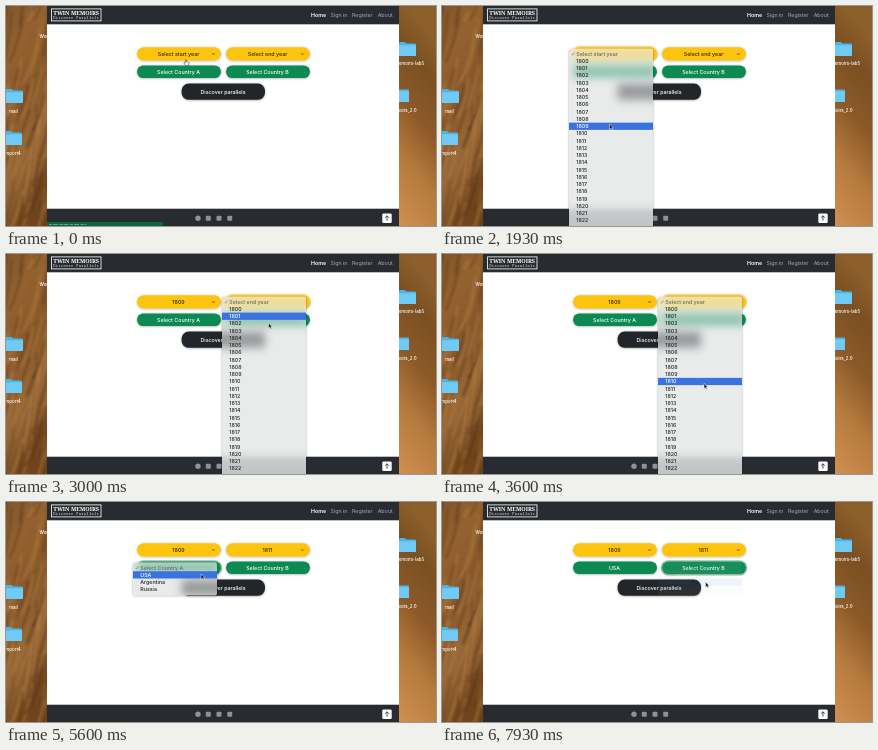
Animation, 430 px wide and 220 px high, one loop 8000 ms. Source, as an HTML page:

```html
<!DOCTYPE html>
<html lang="en">
<head>
<meta charset="utf-8">
<title>Year and country picker</title>
<style>
  html, body { margin: 0; width: 100%; height: 100%; overflow: hidden; background: #fff; }
  #stage { display: block; width: 100vw; height: 100vh; }
  text { font: 500 5.3px Inter, "Open Sans", sans-serif; }
  .desk { font-size: 4.4px; fill: #fff; }
  .nav { fill: #a9abae; font-weight: 400; }
  .home { fill: #fff; font-weight: 600; }
  .name { font: bold 5.6px "Noto Serif", "Liberation Serif", serif; fill: #fff; }
  .tag { font: 3.7px "Noto Sans Mono", "DejaVu Sans Mono", monospace; letter-spacing: .33px; fill: #e8e8e8; }
</style>
</head>
<body>
<svg id="stage" viewBox="0 0 430 220" preserveAspectRatio="none">
  <defs>
    <linearGradient id="furL" x1="0" y1="0" x2=".3" y2="1">
      <stop offset="0" stop-color="#80562b"/><stop offset=".25" stop-color="#94622f"/>
      <stop offset=".5" stop-color="#875729"/><stop offset=".75" stop-color="#9a6a38"/>
      <stop offset="1" stop-color="#74481f"/>
    </linearGradient>
    <linearGradient id="furR" x1=".3" y1="0" x2=".1" y2="1">
      <stop offset="0" stop-color="#8d602b"/><stop offset=".2" stop-color="#7b5022"/>
      <stop offset=".45" stop-color="#8c5a28"/><stop offset=".7" stop-color="#b57a3d"/>
      <stop offset="1" stop-color="#cd8f50"/>
    </linearGradient>
    <filter id="drop" x="-20%" y="-20%" width="140%" height="150%">
      <feDropShadow dx="0" dy=".5" stdDeviation=".9" flood-opacity=".35"/>
    </filter>
    <filter id="blur" x="-40%" y="-150%" width="180%" height="400%">
      <feGaussianBlur stdDeviation="4.5"/>
    </filter>
    <filter id="hair" x="-50%" y="-20%" width="200%" height="140%">
      <feGaussianBlur stdDeviation=".8"/>
    </filter>
  </defs>
</svg>
<script>
const LOOP = 8000, ROW = 7.25;
const YELLOW = '#fdc40c', GREEN = '#0d8a52', DARK = '#282c31';
const stage = document.getElementById('stage');

function el(parent, tag, attrs = {}, content) {
  const node = document.createElementNS('http://www.w3.org/2000/svg', tag);
  for (const key in attrs) node.setAttribute(key, attrs[key]);
  if (content !== undefined) node.textContent = content;
  parent.append(node);
  return node;
}
const rect = (parent, x, y, width, height, fill, rx = 0, more = {}) =>
  el(parent, 'rect', { x, y, width, height, fill, rx, ...more });
const path = (parent, d, more) => el(parent, 'path', { d, fill: 'none', ...more });
const label = (parent, x, y, content, more = {}) =>
  el(parent, 'text', { x, y: y + 1.9, ...more }, content);
// A nested viewport that cuts off whatever lies outside it
const pane = (parent, x, y, width, height) =>
  el(parent, 'svg', { x, y, width, height, viewBox: `${x} ${y} ${width} ${height}` });

// Desktop: soft fur and folders
function fur(x, width, fill, strands, seed) {
  const g = pane(stage, x, 0, width, 220);
  rect(g, x, 0, width, 220, fill);
  const hair = el(g, 'g', { filter: 'url(#hair)' });
  let s = seed;
  const rnd = () => (s = (s * 16807) % 2147483647) / 2147483647;
  for (let i = 0; i < strands; i++) {
    const px = x + rnd() * (width + 15), py = rnd() * 240 - 40, lean = 6 + rnd() * 12;
    path(hair, `M${px} ${py}q${-lean * .2} 22 ${-lean} ${35 + rnd() * 25}`, {
      stroke: i % 2 ? '#c08a4a' : '#4a2c12', 'stroke-width': 1 + rnd() * 2, opacity: .32
    });
  }
  return g;
}
function folder(g, x, y, name, nx, ny) {
  path(g, `M${x} ${y + 1}q0-1 1-1h5l1.5 1.6h8.5q1 0 1 1v10.4q0 1-1 1h-15q-1 0-1-1z`, { fill: '#4fb4e4' });
  rect(g, x, y + 3.2, 17, 10.8, '#6fcbf3', 1);
  label(g, nx, ny, name, { class: 'desk', 'text-anchor': 'middle' });
}
const deskL = fur(0, 41, 'url(#furL)', 70, 77);
folder(deskL, 0, 83, 'mail', 7.5, 105);
folder(deskL, -1, 125, 'import4', 6.5, 147);
label(deskL, 33.5, 30, 'Work', { class: 'desk' });
const deskR = fur(393, 37, 'url(#furR)', 0, 1);
folder(deskR, 393, 36, 'memoirs-lab5', 403.5, 57.5);
folder(deskR, 386, 82, 'memoirs_2.0', 397, 104);

// Browser page
rect(stage, 41, 0, 352, 220, '#fff');
rect(stage, 41, 0, 352, 18.3, DARK);
rect(stage, 41, 202.7, 352, 17.3, DARK);
rect(stage, 45.5, 2.9, 49.5, 12, 'none', 0, { stroke: '#fff', 'stroke-width': .8 });
label(stage, 70.2, 6.6, 'TWIN MEMOIRS', { class: 'name', 'text-anchor': 'middle' });
label(stage, 70.2, 11.3, 'Discover Parallels', { class: 'tag', 'text-anchor': 'middle' });
label(stage, 305, 9, 'Home', { class: 'home' });
[[324.5, 'Sign in'], [346, 'Register'], [371.7, 'About']].forEach(([x, s]) =>
  label(stage, x, 9, s, { class: 'nav' }));
[192, 202.3, 213, 223.7].forEach((cx, i) => i
  ? rect(stage, cx - 2.5, 209.7, 5, 5, '#8f9295', 1)
  : el(stage, 'circle', { cx, cy: 212.2, r: 2.7, fill: '#8f9295' }));
rect(stage, 376.3, 207.5, 9.4, 9.4, '#fff', 1.2);
path(stage, 'M381 214.6v-4.8m-1.9 1.9l1.9-1.9 1.9 1.9', { stroke: '#222', 'stroke-width': .8 });
const strip = el(stage, 'g');
rect(strip, 41, 216, 116, 4, '#12653f');
path(strip, 'M43 218.5H80', { stroke: '#4fae7c', 'stroke-width': 1, 'stroke-dasharray': '3 1 5 1.5' });

function button(x, y, h, fill, color, chevron) {
  const ring = rect(stage, x - .7, y - .7, 85.4, h + 1.4, 'none', h / 2 + .7,
    { stroke: fill, 'stroke-width': 1.3, opacity: .4 });
  rect(stage, x, y, 84, h, fill, h / 2, { filter: 'url(#drop)' });
  if (chevron) path(stage, `M${x + 75} ${y + 6}l1.5 1.5 1.5-1.5`, { stroke: '#4a3d10', 'stroke-width': .8 });
  const text = label(stage, x + 41.5, y + h / 2, '', { fill: color, 'text-anchor': 'middle' });
  return { ring, text };
}
const buttons = [
  button(131, 41.2, 13.2, YELLOW, '#2c2410', true),
  button(220, 41.2, 13.2, YELLOW, '#2c2410', true),
  button(131, 59.5, 12.6, GREEN, '#fff'),
  button(220, 59.5, 12.6, GREEN, '#fff')
];
rect(stage, 175.6, 77.6, 83.4, 16.2, '#212529', 7, { filter: 'url(#drop)' });
label(stage, 217, 85.7, 'Discover parallels', { fill: '#fff', 'text-anchor': 'middle' });

// Frosted menu panel: the page shows through, blurred
function frost(g, x, y, h) {
  rect(g, x, y, 84, h, '#e9ebeb', 2, { filter: 'url(#drop)' });
  const glass = el(pane(g, x, y, 84, h), 'g', { opacity: .4 });
  const spot = (...shape) => rect(glass, ...shape, 0, { filter: 'url(#blur)' });
  for (const left of [131, 220]) {
    spot(left, 41, 84, 14, YELLOW);
    spot(left, 59, 84, 13, GREEN);
  }
  spot(175.6, 77.6, 83.4, 16.2, '#212529');
  spot(41, 203, 352, 30, '#8b8e90');
}

const years = Array.from({ length: 24 }, (_, i) => String(1800 + i));
const countries = ['USA', 'Argentina', 'Russia'];
const menus = [
  { title: 'Select start year', pick: '1809', items: years, x: 127, open: 470, close: 1970, set: 2200 },
  { title: 'Select end year', pick: '1811', items: years, x: 216, open: 2670, close: 3930, set: 4400 },
  { title: 'Select Country A', pick: 'USA', items: countries, x: 127, open: 5000, close: 5900, set: 6200 },
  { title: 'Select Country B', pick: '', items: countries, x: 216, open: 6670, close: 7730, set: LOOP }
];
for (const m of menus) {
  const long = m.items === years;
  m.y = long ? 47.75 : 65.6;
  m.g = el(stage, 'g');
  frost(m.g, m.x, m.y - 5, long ? 190 : 32.6);
  m.bar = rect(m.g, m.x, 0, 84, ROW, '#3a73df');
  path(m.g, `M${m.x + 2.6} ${m.y + .3}l1 1.2 1.7-2.8`, { stroke: '#6a736c', 'stroke-width': .6 });
  label(m.g, m.x + 7.3, m.y, m.title, { fill: '#626b64' });
  m.rows = m.items.map((s, i) => label(m.g, m.x + 7.3, m.y + ROW * (i + 1), s));
}

// Pointer
const arrow = path(stage, 'M0 0V5.3L1.3 4.2 2.2 6.1 3.1 5.7 2.3 3.8H3.9z',
  { fill: '#111', stroke: '#fff', 'stroke-width': .5 });
const hand = path(stage, 'M-.6 .5Q0-.4 .6 .5V2.3L2.8 2.8Q3.3 3 3.1 4L2.5 6H-.5L-2 3.7Q-1.6 3-.6 3.7z',
  { fill: '#fff', stroke: '#222', 'stroke-width': .5 });
const track = [
  [0, 180, 53.5], [270, 175, 49.5], [470, 174, 48], [600, 174, 50], [1270, 167, 113],
  [1470, 167, 113], [1530, 167.5, 118], [2000, 167.5, 118], [2470, 262, 48], [2670, 262, 50],
  [3000, 262.5, 68.5], [3470, 262, 120], [3670, 262, 134], [3900, 262, 134], [4200, 238.5, 99.5],
  [4400, 210, 80], [4730, 190, 66], [5470, 189, 66], [5530, 193, 71], [5600, 195, 72],
  [5930, 195, 72], [6530, 265, 66], [7000, 265.5, 65.5], [7400, 263.5, 80], [LOOP, 263.5, 80]
];
function pointer(t) {
  const i = Math.max(1, track.findIndex(k => k[0] >= t));
  const [t0, x0, y0] = track[i - 1], [t1, x1, y1] = track[i];
  const f = Math.max(0, (t - t0) / (t1 - t0));
  return [x0 + (x1 - x0) * f, y0 + (y1 - y0) * f];
}

const show = (node, on) => { node.style.display = on ? '' : 'none'; };

function draw(now) {
  const t = Math.floor((now % LOOP) * .015 + .06) / .015 % LOOP + 4;
  const [x, y] = pointer(t);
  show(strip, t < 130);
  let busy = false;
  menus.forEach((m, i) => {
    const alpha = t < m.open || t >= m.close + 470 ? 0
      : t < m.close ? 1 : Math.exp((m.close - t) / 80);
    busy = busy || alpha === 1;
    show(m.g, alpha > 0);
    m.g.setAttribute('opacity', alpha);
    // The highlight trails the pointer slightly
    const row = Math.round((pointer(Math.min(t, m.close) - 70)[1] - m.y) / ROW);
    const lit = row > 0 && row <= m.items.length;
    show(m.bar, lit);
    m.bar.setAttribute('y', m.y + ROW * (row - .5));
    m.rows.forEach((r, n) => r.setAttribute('fill', lit && n + 1 === row ? '#fff' : '#232625'));
    buttons[i].text.textContent = t >= m.set ? m.pick : m.title;
    const end = i < 3 ? menus[i + 1].open : LOOP;
    show(buttons[i].ring, t >= m.open && t < end);
  });
  const over = !busy && x > 131 && x < 304 && ((y > 41 && y < 54.5) || (y > 59.5 && y < 72));
  show(arrow, !over);
  show(hand, over);
  (over ? hand : arrow).setAttribute('transform', `translate(${x} ${y})`);
}

const start = performance.now();
function tick() {
  draw(performance.now() - start);
  requestAnimationFrame(tick);
}
tick();
</script>
</body>
</html>
```
